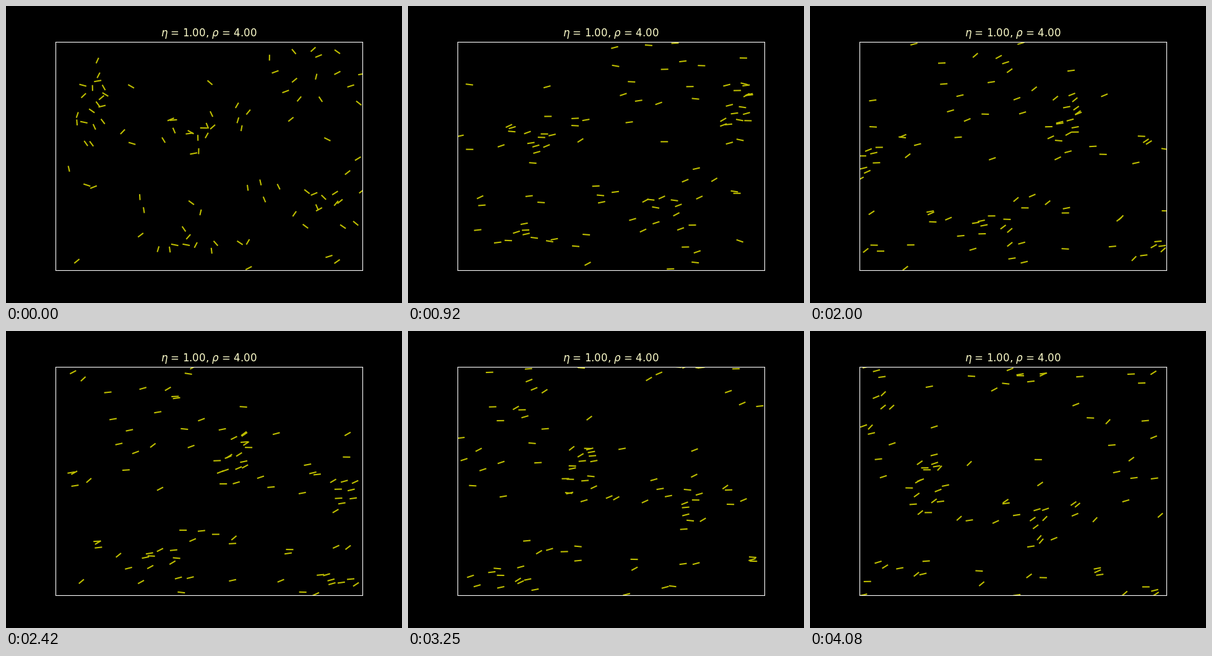
A matplotlib script for the animation above (4160 ms loop, 640 by 480 pixels).

```python
import numpy as np
import matplotlib.pyplot as plt
from matplotlib.animation import FuncAnimation
from matplotlib.collections import LineCollection

# Vicsek model: self-propelled particles in a periodic box
SIZE = 5.0
COUNT = 100
ETA = 1.0
SPEED = 0.1
RADIUS = 1.0
STEPS = 50
LOOP_MS = 4160
PULL = 0.2  # weight of the common drift against the neighbours' mean

# Loose flocks the particles start in
FLOCKS = np.array([(0.7, 4.1), (3.9, 4.4), (2.5, 3.1),
                   (0.6, 2.4), (2.4, 0.9), (4.1, 1.4)])
SPREAD = 0.55


def heading(angle):
    return np.column_stack([np.cos(angle), np.sin(angle)])


def initial_state(rng):
    centres = FLOCKS[np.arange(COUNT) % len(FLOCKS)]
    pos = (centres + rng.normal(0, SPREAD, (COUNT, 2))) % SIZE
    return pos, rng.uniform(-np.pi, np.pi, COUNT)


def advance(pos, angle, step, rng):
    gap = pos[:, None] - pos[None]
    gap -= SIZE * np.round(gap / SIZE)
    near = (gap ** 2).sum(axis=2) < RADIUS ** 2
    mean = near @ np.exp(1j * angle) / near.sum(axis=1)
    drift = np.exp(1j * np.radians(190 + 0.4 * step))
    noise = rng.uniform(-ETA / 2, ETA / 2, COUNT)
    angle = np.angle(mean + PULL * drift) + noise
    return (pos + SPEED * heading(angle)) % SIZE, angle


def simulate():
    rng = np.random.default_rng(7)
    pos, angle = initial_state(rng)
    history = []
    for step in range(STEPS):
        half = heading(angle) * SPEED / 2
        history.append(np.stack([pos - half, pos + half], axis=1))
        pos, angle = advance(pos, angle, step, rng)
    return history


history = simulate()

plt.style.use("dark_background")
fig, ax = plt.subplots(figsize=(6.4, 4.8), dpi=100)
ax.set(xlim=(0, SIZE), ylim=(0, SIZE), xticks=[], yticks=[])
ax.set_title(rf"$\eta$ = {ETA:.2f}, $\rho$ = {COUNT / SIZE ** 2:.2f}",
             color="#ffffcc")
marks = LineCollection(history[0], colors="y", linewidths=1.5,
                       capstyle="projecting")
ax.add_collection(marks, autolim=False)


def draw(step):
    marks.set_segments(history[step])
    return [marks]


anim = FuncAnimation(fig, draw, frames=STEPS, interval=LOOP_MS / STEPS,
                     repeat=True, repeat_delay=0)
plt.show()
```
